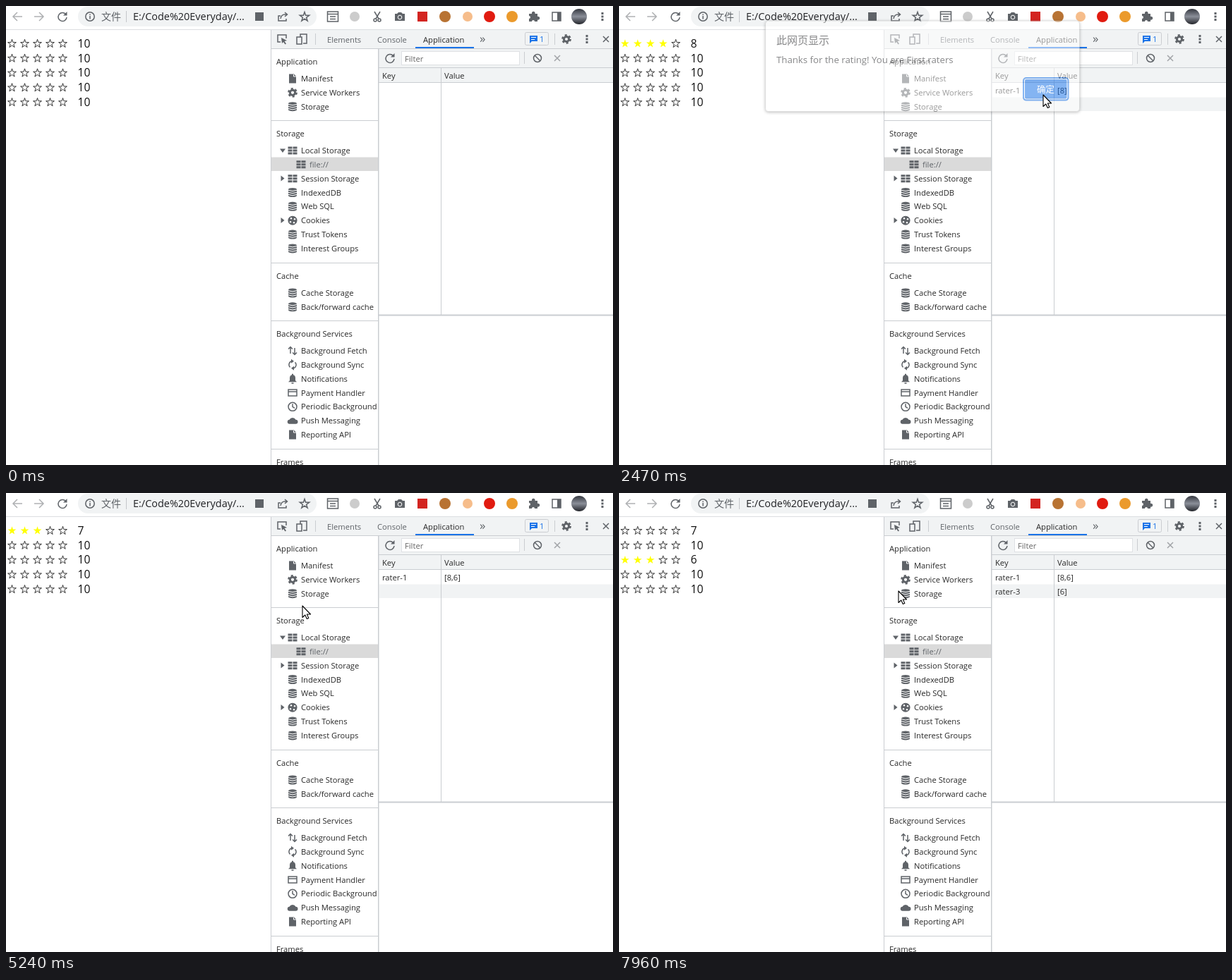
An HTML page that plays this animation: 860x651 px, repeating every 8 s.

```html
<!DOCTYPE html>
<html lang="zh-CN">
<head>
<meta charset="utf-8">
<title>Star rating</title>
<style>
html, body { margin: 0; width: 100%; height: 100%; overflow: hidden; background: #fff; }
svg { display: block; }
text { font: 11.2px "Open Sans", "Noto Sans CJK SC", "Noto Sans CJK", sans-serif; white-space: pre; }
.icon { fill: none; stroke: #5f6368; stroke-width: 1.5; }
.fill { fill: #5f6368; stroke: none; }
.cut { stroke: #fff; stroke-width: 1; }
.panel { filter: drop-shadow(0 1px 2px #0007); }
</style>
</head>
<body>
<svg width="860" height="651" viewBox="0 0 860 651">
  <g id="base"></g>
  <g id="page"></g>
  <g id="dialog"></g>
  <g id="cursor"></g>
</svg>
<script>
const LOOP = 8000, STEP = 70;
const layer = id => document.getElementById(id);
const rect = (x, y, w, h, fill, extra = '') =>
  `<rect x="${x}" y="${y}" width="${w}" height="${h}" fill="${fill}" ${extra}/>`;
const text = (x, y, s, size = 11.2, fill = '#292929') =>
  `<text x="${x}" y="${y}" style="font-size:${size}px;fill:${fill}">${s}</text>`;
const path = (d, cls = '') => `<path class="${cls}" d="${d}"/>`;
const dot = (x, y, r, fill) => `<circle cx="${x}" cy="${y}" r="${r}" fill="${fill}" stroke="none"/>`;

function starPath(cx, cy, r) {
  let d = '';
  for (let i = 0; i < 10; i++) {
    const a = Math.PI * (i / 5 - 0.5), q = i % 2 ? r * 0.39 : r;
    d += `${i ? 'L' : 'M'}${(cx + q * Math.cos(a)).toFixed(2)} ${(cy + q * Math.sin(a)).toFixed(2)}`;
  }
  return d + 'z';
}

const icons = {
  reload: path('M4.5-3.5A6 6 0 1 0 6 1') + path('M6.5-7v5.5h-5.5z', 'fill'),
  dots: path('M-1.5-6h3v3h-3zM-1.5-1.5h3v3h-3zM-1.5 3h3v3h-3z', 'fill'),
  cross: path('M-4-4L4 4M4-4L-4 4'),
  back: path('M7 0H-6M0-6L-6 0L0 6'),
  forward: path('M-7 0H6M0-6L6 0L0 6'),
  info: '<circle r="6.2"/>' + path('M0-1v4.5M0-3.6v1.5'),
  share: path('M-3-1H-6V6H5V3M-3 3Q-2-3 3-3H6M3-6L6.5-3L3 0'),
  bookmark: path(starPath(0, 0.5, 7)),
  reader: path('M-7.5-7h15v14h-15zM-7-3.5h14M-4 0H4M-4 3.5H4'),
  scissors: '<circle cx="-3" cy="5" r="2"/><circle cx="3" cy="5" r="2"/>' + path('M-2 3L4-7M2 3L-4-7'),
  camera: path('M-7-4h3l2-2h4l2 2h3v10h-14z', 'fill') + '<circle r="2.8" cy="1" class="cut"/>',
  puzzle: path('M-7-4h4a2.4 2.4 0 1 1 4.5 0H5v4a2.4 2.4 0 1 1 0 4.5V7H1a2 2 0 1 0-4 0h-4V3a2 2 0 1 0 0-4z', 'fill'),
  side: path('M-6-6H6V6H-6z') + path('M1-6H6V6H1z', 'fill'),
  inspect: path('M6-1V-6H-6V4H-2') + path('M-1-2L7 2L3.5 3L6 6.5L4.5 7.5L2 4L0 6z', 'fill'),
  device: path('M-2-3V-7H7V6H2M-7-3H0V7H-7z'),
  block: '<circle r="5.5"/>' + path('M-4-4L4 4'),
  doc: path('M-5-6.5H2L5-3.5V6.5H-5z', 'fill') + path('M1.5-6V-3H5', 'cut'),
  gear: '<circle r="3.6" stroke-width="3"/><circle r="5.5" stroke-width="2.8" stroke-dasharray="2.9 2.86"/>',
  db: path('M-6-4.5a6 2 0 0 1 12 0v9a6 2 0 0 1-12 0z', 'fill') + path('M-6-3.3q6 2.6 12 0M-6-.2q6 2.6 12 0M-6 2.9q6 2.6 12 0', 'cut'),
  grid: path([-5.5, -1.5, 2.5].map(y => `M-6.5 ${y}h6v3h-6zM.5 ${y}h6v3h-6z`).join(''), 'fill'),
  cookie: '<circle r="6.5" class="fill"/>' + [[-2, -3], [-3, 2], [2, 3], [3, -2]].map(([x, y]) => dot(x, y, 1.2, '#fff')).join(''),
  arrows: path('M-3 4V-5M-6-2.5L-3-5.5L0-2.5M3-4V5M0 2.5L3 5.5L6 2.5'),
  sync: path('M-3.5 3.5A5 5 0 0 1-1-5M3.5-3.5A5 5 0 0 1 1 5') + path('M-2-8L2-5L-2-2zM2 8L-2 5L2 2z', 'fill'),
  bell: path('M-6 4.5L-4 2.5V-1Q-4-5-1-5.5V-7H1V-5.5Q4-5 4-1V2.5L6 4.5zM-1.5 5.5h3v1.5h-3z', 'fill'),
  card: path('M-6-4.5H6V4.5H-6zM-6-1.5H6'),
  clock: '<circle r="6"/>' + path('M0-4V0L3 2'),
  cloud: path('M-4 4.5a3 3 0 0 1-.5-6a5 5 0 0 1 9 0a3 3 0 0 1 0 6z', 'fill'),
};
const icon = (name, x, y, opacity = 1) =>
  `<g class="icon" transform="translate(${x} ${y})" opacity="${opacity}">${icons[name]}</g>`;

const sidebar = [
  ['Application', 79, ['doc', 'Manifest', 'gear', 'Service Workers', 'db', 'Storage']],
  ['Storage', 181, ['grid', 'Local Storage', 'grid', 'file://', 'grid', 'Session Storage', 'db', 'IndexedDB',
    'db', 'Web SQL', 'cookie', 'Cookies', 'db', 'Trust Tokens', 'db', 'Interest Groups']],
  ['Cache', 383, ['db', 'Cache Storage', 'db', 'Back/forward cache']],
  ['Background Services', 465, ['arrows', 'Background Fetch', 'sync', 'Background Sync', 'bell', 'Notifications',
    'card', 'Payment Handler', 'clock', 'Periodic Background', 'cloud', 'Push Messaging', 'doc', 'Reporting API']],
  ['Frames', 647, []],
];

function toolbar() {
  let s = rect(102, 1, 338, 28, '#f1f3f4', 'rx="14"') + rect(0, 33, 860, 1, '#dcdee1');
  s += icon('back', 16, 15, 0.5) + icon('forward', 47, 15, 0.5) + icon('reload', 80, 15);
  s += icon('info', 119, 15) + text(135, 20, '文件', 14, '#5f6368') + rect(170, 7, 1, 16, '#c4c7cb');
  s += text(180, 20, 'E:/Code%20Everyday/...', 14.45, '#202124');
  s += rect(353, 9, 12, 12, '#5f6368') + icon('share', 392, 15) + icon('bookmark', 423, 15);
  s += icon('reader', 463, 15) + dot(494, 15, 7, '#ccc') + icon('scissors', 526, 15) + icon('camera', 558, 15);
  s += rect(583, 8, 14, 14, '#d32420') + dot(622, 15, 8, '#b87333') + dot(654, 15, 7, '#f6bd8b');
  s += dot(685, 15, 8, '#e11b10') + dot(717, 15, 8, '#eb9a2c') + icon('puzzle', 748, 15) + icon('side', 780, 15);
  return s + '<linearGradient id="avatar" x2="0" y2="1"><stop stop-color="#34373f"/><stop offset=".5" stop-color="#8b8f99"/>' +
    '<stop offset="1" stop-color="#23252b"/></linearGradient>' + dot(812, 15, 11, 'url(#avatar)') + icon('dots', 845, 15);
}

function devtools() {
  const line = '#cacdd1', bar = '#f1f3f4';
  let s = rect(375, 34, 485, 27, bar) + rect(528, 61, 332, 48, bar);
  s += rect(375, 60, 485, 1, line) + rect(528, 87, 332, 1, line) + rect(528, 108, 332, 1, line);
  s += rect(375, 34, 1, 617, line) + rect(527, 61, 1.5, 590, line);
  s += rect(528, 437.5, 332, 2, line);
  s += icon('inspect', 391, 47) + icon('device', 419, 47) + rect(438, 39, 1, 16, line);
  s += text(455, 52, 'Elements', 11.2, '#5f6368') + text(526, 52, 'Console', 11.2, '#5f6368') + text(591, 52, 'Application');
  s += rect(580, 58, 83, 2, '#1a73e8') + text(671, 52, '»', 17, '#5f6368');
  s += rect(735.5, 37.5, 33, 18, 'none', `stroke="${line}" rx="2"`);
  s += '<path d="M742 42h11v8h-8l-3 3z" fill="#1a73e8"/><path d="M744 44.5h7M744 47.5h5" stroke="#fff"/>';
  s += text(756, 51, '1', 11.2, '#1a73e8') + rect(777, 39, 1, 16, line);
  s += icon('gear', 794, 47) + icon('dots', 823, 47) + icon('cross', 850, 47);
  s += icon('reload', 544, 74) + rect(560.5, 64.5, 167, 19, '#fff', 'stroke="#dfe1e4"') + text(565, 79, 'Filter', 11.2, '#666');
  s += rect(734, 65, 1, 17, line) + icon('block', 753, 74) + icon('cross', 781, 74, 0.55);
  s += text(533, 103, 'Key') + text(621, 103, 'Value');

  s += rect(376, 214.5, 151, 19.5, '#dadada');
  for (const [title, top, items] of sidebar) {
    if (top > 79) s += rect(376, top - 19, 151, 1, line);
    s += text(383, top + 4, title);
    for (let i = 0; i < items.length; i += 2) {
      const y = top + 24 + i * 9.92, indent = items[i + 1] === 'file://' ? 12 : 0;
      s += icon(items[i], 406 + indent, y) + text(418 + indent, y + 4, items[i + 1], 11.2, indent ? '#5f6368' : '#292929');
    }
  }
  return s + path('M388 202.5h8l-4 5.5z', 'fill') + path('M389.5 240.5v8l5-4zM389.5 300v8l5-4z', 'fill');
}

// Each vote: dialog times, rated row, lit stars, new score, stored values and message.
const votes = [
  { open: 1170, close: 2400, row: 0, stars: 4, score: 8, stored: ['rater-1', '[8]'],
    message: ['Thanks for the rating! You are First raters'] },
  { open: 4000, close: 5030, row: 0, stars: 3, score: 7, stored: ['rater-1', '[8,6]'],
    message: ['Thanks for the rating! You are NO.2 raters. At present, the average', 'score of this movie is 7.'] },
  { open: 7100, close: 7750, row: 2, stars: 3, score: 6, stored: ['rater-1', '[8,6]', 'rater-3', '[6]'],
    message: ['Thanks for the rating! You are First raters'] },
];

// Pointer path: time, x, y.
const track = [
  [0, 790, 690], [70, 774, 640], [350, 420, 330], [630, 120, 90], [840, 59, 56], [1630, 59, 57], [1700, 106, 57],
  [1980, 480, 110], [2190, 602, 122], [2400, 604, 124], [2540, 598, 128], [2820, 380, 150], [3100, 140, 110],
  [3300, 66, 58], [3450, 62, 10], [3590, 53, 56], [3860, 43, 57], [4140, 43, 57], [4280, 60, 64], [4560, 498, 145],
  [4750, 600, 143], [5030, 604, 146], [5240, 420, 160], [5450, 190, 164], [5520, 172, 165], [5800, 60, 110],
  [5940, 31, 87], [6220, 33, 90], [6440, 33, 90], [6860, 42, 94], [7190, 42, 94], [7260, 60, 92], [7540, 560, 120],
  [7610, 604, 124], [7750, 604, 124], [7960, 396, 139], [8000, 396, 139],
];
// The screen is refreshed every STEP ms from each of these times on.
const starts = [0, 70, 900, 1170, 1700, 2540, 3380, 3860, 4680, 5520, 6440, 7260];

function pointer(t) {
  const i = track.findIndex(k => k[0] > t);
  const [t0, x0, y0] = track[i - 1], [t1, x1, y1] = track[i], p = (t - t0) / (t1 - t0);
  return [x0 + (x1 - x0) * p, y0 + (y1 - y0) * p];
}

function drawPage(t, x, y) {
  const closed = votes.filter(v => t >= v.close), vote = votes.filter(v => t >= v.open).pop();
  const scores = [10, 10, 10, 10, 10];
  closed.forEach(v => scores[v.row] = v.score);

  let row = Math.round((y - 53.5) / 20.8), lit = 0;
  if (vote && (t < vote.close || x >= 375)) ({ row, stars: lit } = vote);
  else if (x > 2 && x < 90 && (x - 2) % 18 < 14) lit = Math.floor((x - 2) / 18) + 1;

  let s = '';
  scores.forEach((score, r) => {
    const cy = 53.5 + r * 20.8;
    for (let i = 0; i < 5; i++) {
      const look = r === row && i < lit ? 'fill="#ff0"' : 'fill="none" stroke="#222" stroke-width=".9"';
      s += `<path d="${starPath(8.5 + 18 * i, cy, 6.2)}" ${look}/>`;
    }
    s += text(101.5, cy + 5.3, score, 15.7, '#111');
  });
  if (closed.length) {
    const cells = closed[closed.length - 1].stored;
    s += rect(529, 129.5, 331, 19.5, '#f1f3f4');
    cells.forEach((c, i) => s += text(i % 2 ? 621 : 533, 124 + (i >> 1) * 20, c));
  }
  layer('page').innerHTML = s + rect(616, 88, 1, 350, '#cacdd1');
}

function drawDialog(t) {
  const vote = votes.find(v => t >= v.open && t < v.close + 150);
  if (!vote) return layer('dialog').innerHTML = '';
  const shown = Math.min(1, (t - vote.open) / 200, 1 - (t - vote.close) / 150);
  const grow = (vote.message.length - 1) * 19;
  layer('dialog').innerHTML = `<g class="panel" opacity="${shown}" transform="translate(0 ${-18 * (1 - shown)})">` +
    rect(207.5, 29.5, 445, 128.5 + grow, '#fff', 'rx="4" stroke="#bbb" stroke-width=".8"') +
    text(223, 62.5, '此网页显示', 15, '#202124') +
    vote.message.map((m, i) => text(223, 89.5 + 19 * i, m, 13.2, '#202124')).join('') +
    rect(573, 110.5 + grow, 63.5, 31.5, '#fff', 'rx="4" stroke="#1a73e8" stroke-width="2"') +
    rect(575, 112.5 + grow, 59.5, 27.5, '#1a73e8', 'rx="2"') +
    text(592, 131 + grow, '确定', 12.5, '#fff') + '</g>';
}

function drawCursor(x, y) {
  const hand = x < 115 && y > 44 && y < 150;
  const shape = hand
    ? 'M-2 1.5Q0-1 2 1.5V8Q4 6.5 5.5 8.5Q8 7.5 9 9.5Q12 9 12 12V17Q12 19 10 21V23.5H0V21L-6 13.5Q-6.5 10.5-4 11.5L-2 14zM2 8v4M5.5 9v3.5M9 10v3'
    : 'M0 0V16.5L3.8 13L6.3 18.5L8.8 17.4L6.4 12H11.5z';
  layer('cursor').innerHTML =
    `<path transform="translate(${x} ${y})" d="${shape}" fill="#fff" stroke="#000" stroke-width="1.1" stroke-linejoin="round"/>`;
}

layer('base').innerHTML = toolbar() + devtools();
let last = -1;
function frame(now) {
  const time = now % LOOP;
  const start = starts.filter(s => s <= time).pop();
  const t = start + Math.floor((time - start) / STEP) * STEP;
  if (t !== last) {
    const [x, y] = pointer(t);
    drawPage(t, x, y);
    drawDialog(t);
    drawCursor(x, y);
    last = t;
  }
  requestAnimationFrame(frame);
}
frame(0);
</script>
</body>
</html>
```
